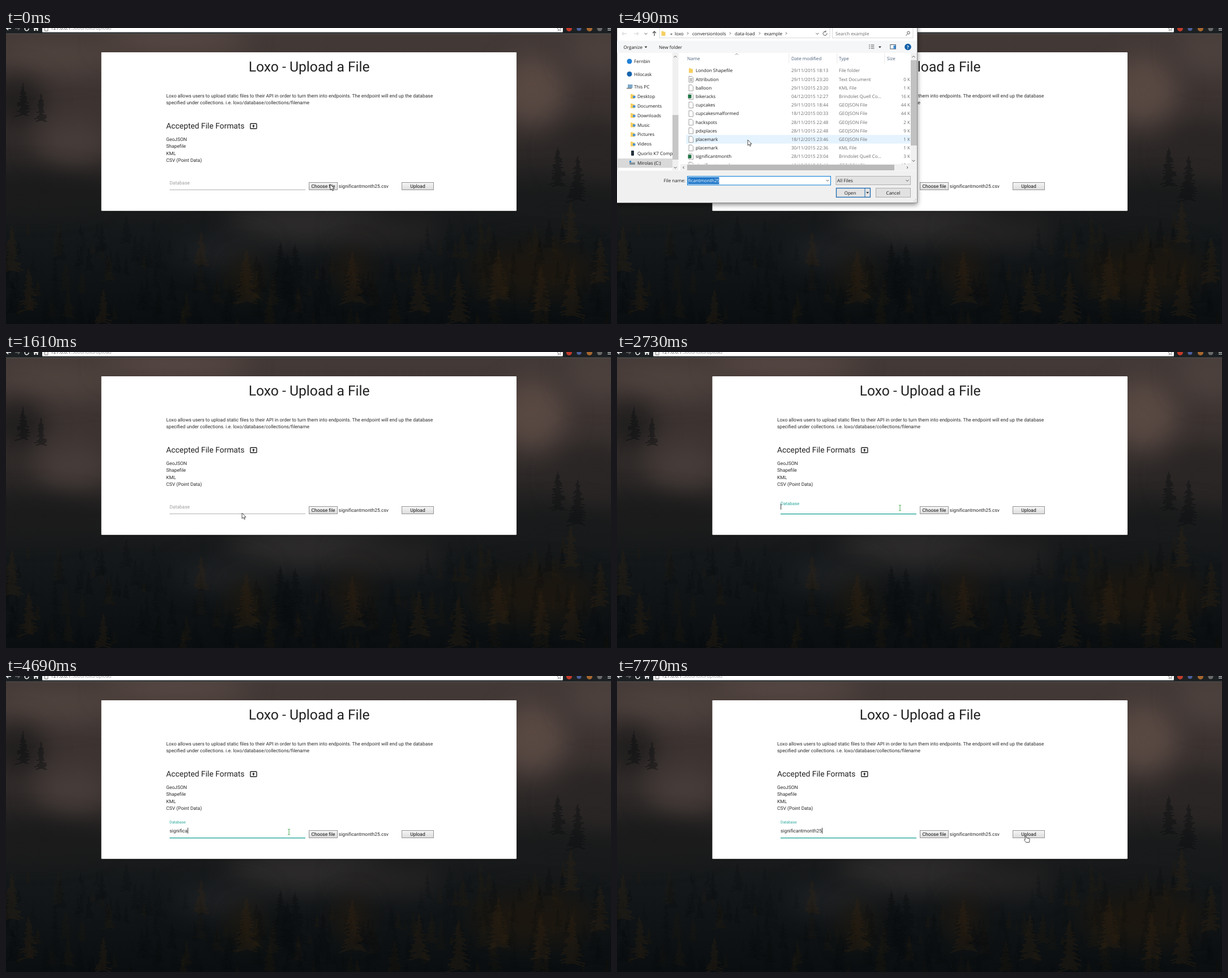
Recreate the animation shown at these times as an HTML page with a canvas. Size 1069x524 px, loop 8000 ms.

```html
<!DOCTYPE html>
<html lang="en">
<head>
<meta charset="utf-8">
<title>Upload a File</title>
<style>
html, body { margin: 0; width: 100%; height: 100%; overflow: hidden; background: #111; }
canvas, svg { position: absolute; left: 0; top: 0; }
text { font: 8.47px Roboto, sans-serif; fill: #2b2b2b; text-rendering: geometricPrecision; white-space: pre; }
.win text { font: 8.05px "Open Sans", sans-serif; fill: #1a1a1a; }
.win .dim { fill: #6d6d6d; }
.win .sel { fill: #fff; }
.line { fill: none; stroke: #555; }
</style>
</head>
<body>
<canvas id="photo" width="1069" height="524"></canvas>
<svg id="stage" width="1069" height="524" viewBox="0 0 1069 524"></svg>
<script>
const $ = id => document.getElementById(id);

// Backdrop: misty forest in soft tones
const g = $('photo').getContext('2d');
let seed = 7;
const rnd = () => (seed = seed * 16807 % 2147483647) / 2147483647;
const sky = g.createLinearGradient(0, 0, 0, 524);
[[0, '#443a37'], [.3, '#3a3230'], [.55, '#1d1d1d'], [.72, '#131719'], [1, '#0a0e10']]
  .forEach(([p, c]) => sky.addColorStop(p, c));
g.fillStyle = sky;
g.fillRect(0, 0, 1069, 524);

function fog(x, y, rx, ry, color) {
  g.filter = 'blur(22px)';
  g.fillStyle = color;
  g.beginPath();
  g.ellipse(x, y, rx, ry, 0, 0, 7);
  g.fill();
  g.filter = 'none';
}
function tree(x, y, h, color, alpha) {
  g.strokeStyle = color;
  g.globalAlpha = alpha;
  g.lineWidth = 1.5;
  for (let i = 0; i < h; i += 2.5) {
    const a = (i / h) ** .8 * h * .24 * (.3 + .9 * rnd());
    const b = (i / h) ** .8 * h * .24 * (.3 + .9 * rnd());
    g.beginPath();
    g.moveTo(x - a, y + i + a * .3);
    g.lineTo(x, y + i);
    g.lineTo(x + b, y + i + b * .3);
    g.stroke();
  }
  g.globalAlpha = 1;
}
fog(90, 50, 110, 28, '#51443f');
fog(300, 22, 130, 22, '#5a4a45');
fog(20, 130, 50, 45, '#201e1e');
fog(120, 200, 70, 45, '#463c39');
fog(40, 290, 130, 30, '#1b1b1b');
fog(930, 110, 60, 60, '#594943');
fog(1050, 40, 60, 40, '#4c413d');
fog(1040, 220, 70, 60, '#2a2625');
fog(980, 310, 120, 30, '#181a1b');
fog(530, 345, 140, 38, '#2d2b2b');
fog(380, 395, 80, 25, '#202224');
fog(680, 360, 90, 30, '#252323');
fog(425, 440, 25, 35, '#1f190f');
fog(612, 430, 25, 35, '#241b11');
fog(930, 430, 110, 45, '#1c1710');
for (let i = 0; i < 260; i++) {
  const y = 325 + 190 * rnd(), x = 1069 * rnd();
  const misty = x > 340 && x < 720 && y < 390;
  if (!misty) tree(x, y, 18 + 40 * rnd(), rnd() < .35 ? '#35260f' : '#070b0d', .14 + .18 * rnd());
}
[[30, 95, 60], [62, 115, 50], [975, 210, 70], [1010, 225, 80], [485, 378, 95], [511, 381, 90], [498, 400, 90], [560, 420, 70]]
  .forEach(([x, y, h]) => tree(x, y, h, '#0a0d0f', .6));
[[40, 425, 75], [172, 462, 60], [345, 360, 60], [425, 390, 95], [612, 395, 90], [10, 350, 80], [870, 390, 90],
 [998, 305, 75], [945, 420, 80], [1050, 370, 80], [730, 420, 80], [800, 430, 90], [1000, 420, 90]]
  .forEach(([x, y, h]) => tree(x, y, h, '#3b2914', .42));

// Markup helpers
const text = (x, y, s, more = '') => `<text x="${x}" y="${y}" ${more}>${s}</text>`;
const rect = (x, y, w, h, fill, more = '') => `<rect x="${x}" y="${y}" width="${w}" height="${h}" fill="${fill}" ${more}/>`;
const dot = (x, y, r, fill) => `<circle cx="${x}" cy="${y}" r="${r}" fill="${fill}"/>`;
const line = (d, more = '') => `<path class="line" d="${d}" ${more}/>`;
const edge = c => `stroke="${c}"`;
const chevron = (x, y) => line(`M${x - 2.5} ${y - 1.2}l2.5 2.5 2.5-2.5`);
const angle = (x, y) => line(`M${x - 1} ${y - 2}l2 2-2 2`);
const triangle = (x, y) => `<path d="M${x - 2.5} ${y - 1}h5l-2.5 3z" fill="#333"/>`;
const folder = (x, y) => `<path d="M${x} ${y - 4}h3l1 1.2h3v7h-7z" fill="#f6cf60"/>`;
const page = (x, y) => `<path d="M${x} ${y - 5}h5l2.5 2.5v8h-7.5z" fill="#fff" stroke="#8a8a8a" stroke-width=".8"/>`;

const browser = () =>
  rect(0, 0, 1069, 10, '#1c2022') + rect(0, 9.6, 1069, 1, '#565656') +
  rect(64, -4, 920, 11.5, '#fff', 'rx="1.5"') + rect(64, 7.5, 920, .8, '#777') +
  line('M9 .8H1m3-3L1 .8l3 3', 'style="stroke:#eee" stroke-width="1.6"') +
  line('M16 .8h8m-3 3l3-3-3-3', 'style="stroke:#666" stroke-width="1.6"') +
  line('M40 1a3.4 3.4 0 1 1-3-3', 'style="stroke:#eee" stroke-width="1.6"') +
  '<path d="M48 .5L53-4l5 4.5h-1.5v4.5h-2.5v-3h-2v3h-2.5v-4.5z" fill="#eee"/>' +
  line('M68.5-3h5.5v8h-5.5z', 'stroke-width=".8"') +
  `<g class="win">${text(79, 3.4, '127.0.0.1<tspan fill="#999">:5000/loxo/upload</tspan>', 'style="font-size:8.45px;fill:#555"')}</g>` +
  line('M974 0l2.5-.5 1-3 1 3 2.5.5-2 2 .6 3-2.1-1.6-2.1 1.6.6-3z', 'stroke-width=".7"') +
  dot(995, 1, 5, '#c23a2b') + dot(1012.5, 1, 4, '#4a5f9c') + dot(1031, 1, 5, '#a5672f') + dot(1049, 1, 4.5, '#6a6a6a') +
  rect(1063, 0, 6, 1.2, '#ddd') + rect(1063, 3, 6, 1.2, '#ddd');

const button = (x, w, label) =>
  rect(x, 273.5, w, 13, 'url(#btn)', edge('#8c8c8c') + ' stroke-width=".9"') +
  text(x + w / 2, 283, label, 'text-anchor="middle" style="fill:#111"');

const card = () =>
  rect(168.4, 43.1, 733.7, 280.6, '#fff', 'rx="1" style="filter:drop-shadow(0 1px 1px #0005)"') +
  text(535.7, 77, 'Loxo - Upload a File', 'text-anchor="middle" style="font-size:24.7px;fill:#212121"') +
  text(283, 122.6, 'Loxo allows users to upload static files to their API in order to turn them into endpoints. The endpoint will end up the database') +
  text(283, 135, 'specified under collections. i.e. loxo/database/collections/filename') +
  text(283, 178.2, 'Accepted File Formats', 'style="font-size:13.86px;fill:#212121"') +
  rect(431.7, 169.2, 11.2, 9, '#fff', 'rx="1" stroke="#222" stroke-width="1.4"') +
  '<path d="M437.3 171l2.5 2.8h-1.6v2.4h-1.8v-2.4h-1.6z" fill="#222"/>' +
  ['GeoJSON', 'Shapefile', 'KML', 'CSV (Point Data)'].map((s, i) => text(283, 199.8 + i * 12.4, s)).join('') +
  text(289, 276.7, 'Database', 'id="label"') +
  '<rect id="rule" x="289" width="240"/>' + text(289, 276.7, '', 'id="typed"') +
  rect(0, 268.6, .9, 10.4, '#222', 'id="caret"') +
  button(535.5, 50, 'Choose file') + text(587.8, 283, 'significantmonth25.csv') + button(699.5, 56, 'Upload');

// File dialog
const G = 'GEOJSON File', SHEET = 'Brindolet Quell Co...';
const files = [
  ['London Shapefile', '29/11/2015 18:13', 'File folder', ''],
  ['Attribution', '29/11/2015 23:20', 'Text Document', '0 K'],
  ['balloon', '29/11/2015 23:20', 'KML File', '1 K'],
  ['bikeracks', '04/12/2015 12:27', SHEET, '16 K'],
  ['cupcakes', '29/11/2015 18:44', G, '44 K'],
  ['cupcakesmalformed', '18/12/2015 00:33', G, '44 K'],
  ['hackspots', '28/11/2015 22:48', G, '2 K'],
  ['pdxplaces', '28/11/2015 22:48', G, '9 K'],
  ['placemark', '18/12/2015 23:46', G, '1 K'],
  ['placemark', '30/11/2015 22:36', 'KML File', '1 K'],
  ['significantmonth', '28/11/2015 23:04', SHEET, '3 K'],
  ['significantmonth', '18/12/2015 22:46', G, '13 K']
];
const rowY = i => 75.3 + 15.2 * i;
const fileRow = ([name, date, type, size], i) => {
  const y = rowY(i), b = y + 3;
  const icon = i === 0 ? folder(127, y) : page(127, y) +
    (type === SHEET ? rect(125.5, y - 3, 6, 6.5, '#1f7244') : '') +
    (i === 1 ? line(`M128.5 ${y - 1}h4.5m-4.5 2h4.5m-4.5 2h4.5`, 'stroke-width=".7"') : '');
  return icon + text(139, b, name) + text(308, b, date, 'class="dim"') +
    text(392, b, type, 'class="dim"') + text(518, b, size, 'class="dim" text-anchor="end"');
};
const places = ['Desktop', 'Documents', 'Downloads', 'Music', 'Pictures', 'Videos', 'Quorlo K7 Comp', 'Mirolas (C:)'];
const place = (s, i) => {
  const y = 121 + 16.85 * i;
  const icon = i < 6 ? folder(24, y) + rect(28, y - 1, 4.5, 4, '#4a90d0')
    : i === 6 ? rect(25, y - 5, 5, 9, '#26323f', 'rx="1"') : rect(22, y - 1, 10, 4, '#8b959c') + rect(22, y - 4, 3, 3, '#2a8fd8');
  return icon + text(36, y + 3, s);
};
const crumbs = [[94, '«'], [102, 'loxo'], [133, 'conversiontools'], [208, 'data-load'], [260, 'example']];

const dialog = () =>
  rect(0, -75, 530.5, 384.5, '#fff', 'stroke="#777" stroke-width=".8" style="filter:drop-shadow(0 3px 4px #0007)"') +
  line('M17 10H9m3-3l-3 3 3 3M30 10h8m-3 3l3-3-3-3', 'style="stroke:#ccc"') + chevron(51, 10) +
  line('M66 14V6m-3 3l3-3 3 3', 'stroke-width="1.3"') +
  rect(75, -2, 301, 19.5, '#fff', edge('#d9d9d9')) + rect(380.5, -2, 142.5, 19.5, '#fff', edge('#d9d9d9')) +
  folder(78.5, 9.5) + crumbs.map(([x, s]) => text(x, 12.8, s)).join('') +
  [125, 200, 252, 299].map(x => angle(x, 9.5)).join('') + chevron(354, 10) +
  line('M371 9a3.5 3.5 0 1 1-2-2.5m0-2v2.5h-2.5') + text(386, 12.8, 'Search example', 'class="dim"') +
  line('M513.5 10.5l-3 3') + '<circle class="line" cx="515" cy="8.5" r="2.3"/>' +
  rect(0, 22.5, 530, 21.5, '#f5f6f7') + text(11.5, 36.6, 'Organize') + triangle(51, 33.5) + text(74, 36.6, 'New folder') +
  line('M445 30h2m1.5 0h6m-9.5 3h2m1.5 0h6m-9.5 3h2m1.5 0h6') + triangle(464.5, 33.5) +
  rect(483, 29.5, 9.5, 7.5, '#fff', edge('#456')) + rect(488.5, 31, 4, 6, '#3d8ad0') +
  dot(514, 33.5, 5.8, '#0f5fa8') + text(514, 36.6, '?', 'text-anchor="middle" class="sel" style="font-weight:700"') +
  // navigation pane
  dot(22, 59, 4.5, '#1f7fd6') + text(30, 62, 'Fernbin') + dot(22, 81.5, 4.5, '#1764ad') + text(30, 84.5, 'Hilocask') +
  rect(19, 100, 8.5, 6, '#7da9c9') + rect(17, 106, 9, 1.5, '#777') + text(30, 107, 'This PC') +
  rect(0, 231, 98, 16.5, '#d9d9d9') + `<g clip-path="url(#nav)">${places.map(place).join('')}</g>` +
  rect(98, 44, 10.5, 208, '#f0f0f0') + rect(98, 154, 10.5, 79, '#c6c6c6') +
  line('M100.5 52l2.5-2.5 2.5 2.5') + chevron(103, 247) +
  // file list
  [[124, 'Name'], [308, 'Date modified'], [392, 'Type'], [477, 'Size']].map(([x, s]) => text(x, 57, s, 'style="fill:#4c607a"')).join('') +
  [303.5, 388.5, 472.5].map(x => rect(x, 45, .8, 18, '#e2e2e2')).join('') + line('M209 47.5l2.5-2.5 2.5 2.5', 'stroke-width=".7"') +
  rect(122, 0, 396.5, 15.4, '#e5f3ff', 'id="hover"') +
  `<g clip-path="url(#list)">${files.map(fileRow).join('')}</g>` +
  rect(519, 44, 11, 197, '#f0f0f0') + rect(519, 57, 11, 151, '#c1c1c1') +
  line('M521.5 52l2.5-2.5 2.5 2.5') + chevron(524, 235) +
  rect(112, 241, 418, 11, '#f0f0f0') + rect(124, 242, 366, 10, '#b9b9b9') +
  angle(513, 247) + line('M118.5 245l-2 2 2 2') +
  // lower panel
  rect(0, 252.5, 530, 56.5, '#f0f0f0') + text(82.5, 273, 'File name:') +
  rect(124.5, 262.5, 253, 15.5, '#fff', edge('#0078d7')) + rect(125.5, 264, 55, 12.5, '#2379c9') +
  text(126, 273, 'ficantmonth25', 'class="sel"') + chevron(372, 270) +
  rect(387, 262.5, 131.5, 15, '#e3e3e3', edge('#b0b0b0')) + text(389, 273, 'All Files') + chevron(513, 270) +
  rect(387.5, 283.5, 60, 16, '#e3e3e3', 'stroke="#1c68ae" stroke-width="1.3"') + rect(437.5, 284, 1, 15, '#1c68ae') +
  text(412, 294.6, 'Open', 'text-anchor="middle"') + triangle(442.7, 291.3) +
  rect(457.5, 283.5, 61, 16, '#e1e1e1', edge('#adadad')) + text(488, 294.6, 'Cancel', 'text-anchor="middle"') +
  [[527, 303], [527, 306], [524, 306]].map(([x, y]) => rect(x, y, 1.3, 1.3, '#aaa')).join('');

const pointers =
  '<path id="arrow" d="M0 0V9.8L2.3 7.8 4 11.3 5.5 10.6 4 7.3H7Z" fill="#fff" stroke="#222" stroke-width=".8"/>' +
  '<path id="beam" d="M-2-5Q0-5 0-4 0-5 2-5M0-4V4M-2 5Q0 5 0 4 0 5 2 5" fill="none" stroke="#4aa84f"/>' +
  '<path id="hand" d="M-.2 7V1.2Q.8 0 1.8 1.2V5L6.5 6Q8 6.4 7.7 8L6.8 13H1.2L-1.8 8.8Q-2 7-.2 8Z" fill="#fff" stroke="#222" stroke-width=".8"/>';

$('stage').innerHTML = `<defs>
  <linearGradient id="btn" x2="0" y2="1"><stop stop-color="#f6f6f6"/><stop offset="1" stop-color="#dcdcdc"/></linearGradient>
  <clipPath id="nav"><path d="M0 44H98V252H0Z"/></clipPath>
  <clipPath id="list"><path d="M112 62H518.5V241H112Z"/></clipPath></defs>` +
  browser() + card() + `<g id="dialog" class="win">${dialog()}</g>` + pointers;

// Motion
const path = [
  [0, 573, 277], [70, 540, 267], [140, 487, 252], [490, 231, 198], [1190, 417, 285], [1750, 417, 285],
  [1960, 440, 301], [2310, 440, 301], [2590, 500, 276], [7350, 500, 276], [7490, 600, 306], [7630, 690, 316], [7770, 721.5, 281.5]
];
const word = 'significantmonth25';
const keyTimes = [3780, 3780, 3920, 4060, 4200, 4340, 4480, 4620, 4690, 4830, 4970, 5320, 5460, 5600, 5740, 5810, 6440, 6580];
const CLOSE = 1330, FOCUS = 2690, BLINK = 490, TEAL = '#26a69a';
const clamp = v => Math.max(0, Math.min(1, v));
const mix = (a, b, k) => a + (b - a) * k;
const show = (id, on) => $(id).style.display = on ? '' : 'none';
const set = (id, attrs) => { for (const k in attrs) $(id).setAttribute(k, attrs[k]); };

function pointerAt(t) {
  const i = path.findIndex(p => p[0] > t);
  if (i < 0) return path[path.length - 1].slice(1);
  const a = path[i - 1], b = path[i], k = (t - a[0]) / (b[0] - a[0]);
  return [mix(a[1], b[1], k), mix(a[2], b[2], k)];
}

function draw(t) {
  const [x, y] = pointerAt(t);
  const alpha = t <= CLOSE ? clamp(t / 185) : clamp(1 - (t - CLOSE) / 200);
  const scale = 1 - (1 - alpha) * .05;
  show('dialog', alpha > 0);
  set('dialog', { opacity: alpha, transform: `translate(265 117) scale(${scale}) translate(-265 -117)` });
  const row = Math.round((y - 75.3) / 15.2);
  show('hover', alpha === 1 && x > 122 && x < 518 && y > 67 && y < 241);
  set('hover', { y: rowY(row) - 7.6 });

  const kind = alpha > 0 ? 'arrow' : x > 289 && x < 529 && y > 262 && y < 284 ? 'beam' : x > 699 && y < 287 ? 'hand' : 'arrow';
  for (const id of ['arrow', 'beam', 'hand']) show(id, id === kind);
  set(kind, { transform: `translate(${x} ${y})` });

  const focused = t > FOCUS, k = 1 - (1 - clamp((t - FOCUS) / 200)) ** 2;
  set('label', { y: mix(276.7, 260.8, k), style: `font-size:${mix(8.47, 6.77, k)}px;fill:${focused ? TEAL : '#9e9e9e'}` });
  set('rule', { y: focused ? 286 : 286.2, height: focused ? 1.4 : .8, fill: focused ? TEAL : '#9e9e9e' });
  const count = keyTimes.filter(k => k <= t).length;
  $('typed').textContent = word.slice(0, count);
  const width = count ? $('typed').getComputedTextLength() : 0;
  set('caret', { x: 289.2 + width });
  const since = t - (count ? keyTimes[count - 1] : t < 3640 ? FOCUS : 3640);
  show('caret', focused && since % (2 * BLINK) < BLINK);
}

function frame(now) {
  draw(Math.floor(now % 8000 / 70) * 70);
  requestAnimationFrame(frame);
}
draw(0);
requestAnimationFrame(frame);
</script>
</body>
</html>
```
